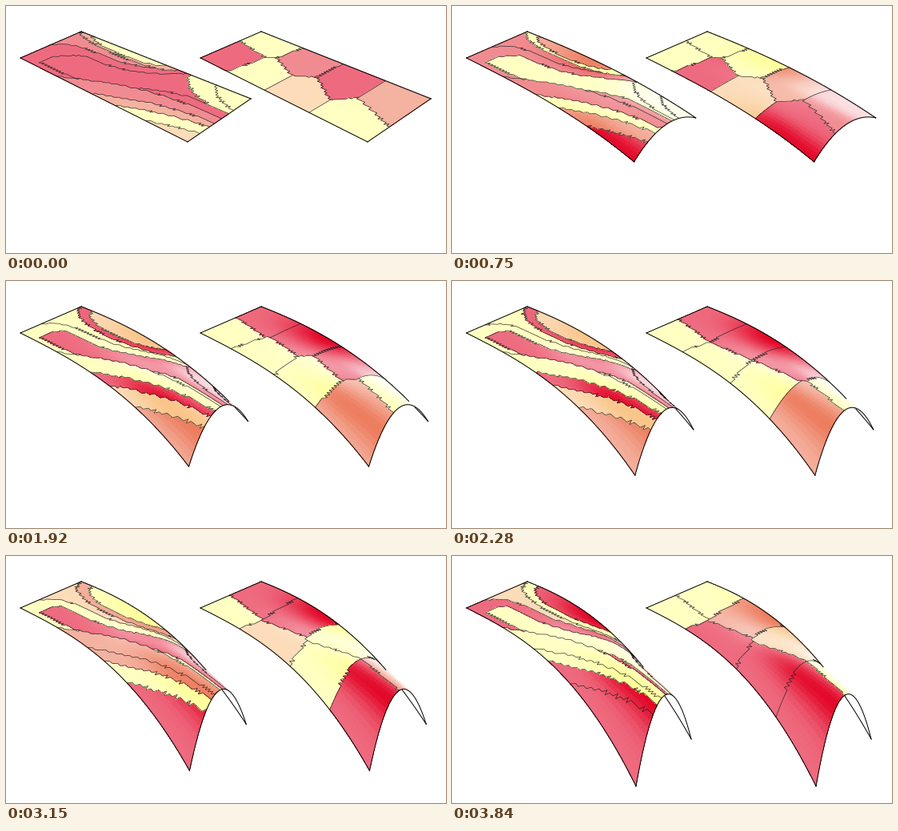
Recreate the animation shown at these times as a matplotlib script. Size 550 by 309 pixels, loop 3.87 s.

```python
import numpy as np
import matplotlib.pyplot as plt
from matplotlib.animation import FuncAnimation
from matplotlib.collections import LineCollection, PolyCollection

W, H, DPI = 550, 309, 100
FRAMES, STEP = 129, 30
NU, NV = 60, 26
SHIFT = 225  # distance between the two plates
PX = 72 / DPI

PALETTE = {
    "R": (226, 0, 34), "E": (229, 57, 65), "S": (236, 122, 91),
    "H": (249, 195, 134), "Y": (255, 255, 150),
}
# Colours are dealt anew at these times.
DEALS = [375, 1080, 1665, 2295, 2910, 3495]
# ring, corner, outer arc, inner arc, tongue, four lower bands, two far zones
BAND_COLORS = ["RESYRESYHYY", "EEYSYEYSRYY", "YRYSRRYSYSS", "YYRHRYRHSRR",
               "YYRSRYRSYRR", "YHSYRSSYRRR", "RHYRYYYRREE"]
CELL_COLORS = ["RYYEHRYS", "YYRYHSRE", "YRRYSHYR", "YRYRYRSY",
               "RYHRSYYR", "YRHRYYRS", "YYRSRHRY"]

# Cell centres (u, v), near and far side in turn, before and after the regrouping
EARLY = np.array([(.07, .33), (.11, .87), (.28, .25), (.36, .78),
                  (.49, .25), (.59, .75), (.81, .2), (.87, .75)])
LATE = np.array([(.09, .24), (.12, .6), (.39, .06), (.35, .68),
                 (.65, .2), (.59, .74), (.87, .25), (.89, .85)])


def smooth(x, lo, hi):
    x = np.clip((x - lo) / (hi - lo), 0, 1)
    return x * x * (3 - 2 * x)


def bump(x, mid, width):
    return np.exp(-((x - mid) / width) ** 2)


def surface(u, v, t):
    """Screen position of the plate point (u, v) at time t."""
    near = .034 * t - 8.5e-7 * t * t
    back = .0325 * t - 8e-7 * t * t
    arch = (near + back) / 2 - .0084 * t
    drop = near * (1 - v) + back * v - 4 * arch * v * (1 - v)
    x = 18 + 209 * u + 76 * v + 3 * u * v + (3 - 10 * v) * u**2 * t / 3840
    y = 65 + 105 * u - 33 * v - 21 * u * v + drop * u**(2.8 - .4 * v)
    return np.stack([x, y], -1)


# Triangle mesh over the plate
gu, gv = np.meshgrid(np.linspace(0, 1, NU + 1), np.linspace(0, 1, NV + 1),
                     indexing="ij")
gu, gv = gu.ravel(), gv.ravel()
node = np.arange(gu.size).reshape(NU + 1, NV + 1)
p, q, r, s = node[:-1, :-1], node[1:, :-1], node[1:, 1:], node[:-1, 1:]
tris = np.stack([np.stack([p, q, r], -1), np.stack([p, r, s], -1)], 2).reshape(-1, 3)
tri_id = np.arange(len(tris)).reshape(NU, NV, 2)
cu, cv = gu[tris].mean(1), gv[tris].mean(1)


def links(a, b, left, right):
    return np.stack([g.ravel() for g in (a, b, left, right)], 1)


# Inner edges: two nodes and the two triangles they part
edges = np.concatenate([
    links(p, r, tri_id[..., 0], tri_id[..., 1]),
    links(q[:-1], r[:-1], tri_id[:-1, :, 0], tri_id[1:, :, 1]),
    links(p[:, 1:], q[:, 1:], tri_id[:, 1:, 0], tri_id[:, :-1, 1]),
])


def band_labels(t):
    u, v = cu, cv
    settle = 1 - np.exp(-(t / 1300) ** 1.5)

    # A tongue along the plate that opens towards the free end
    top = .58 - .19 * settle + 3 * np.maximum(u - .25, 0) ** 2
    bottom = .1 + (.55 - .08 * settle) * smooth(u, .2, .8)
    tongue = (v < top) & (v > bottom) & (u > .08 + .7 * (v - .2) ** 2)
    corner = v > top + .14 - .25 * np.exp(-u / .04)

    # Nested half ellipses on the far edge
    arc = ((u - .285) / .28) ** 2 + ((v - 1) / (.17 + .2 * settle)) ** 2

    # Lower bands start on the near edge and level off
    starts = np.array([.22, .42, .56, .74])
    starts -= np.array([0, .03, .08, .14]) * t / 3840
    lower = [v < (.67 - .5 * k) * np.tanh((u - k) / .33) for k in starts]

    far = [v > .63 + d / 2 + .37 * np.exp((.64 + d - u) / .1) for d in (0, .13)]

    labels = np.zeros(len(tris), int)
    zones = [corner, arc < 1, arc < .58, tongue, *lower, *far]
    for n, zone in enumerate(zones, 1):
        labels[zone] = n
    return labels


def cell_labels(t):
    seeds = EARLY + (LATE - EARLY) * smooth(t, 1410, 2670)
    du = 2.7 * (cu[:, None] - seeds[:, 0])
    dv = cv[:, None] - seeds[:, 1]
    return np.argmin(du**2 + dv**2, 1)


def whiteness(t):
    """Share of white mixed in: deep on the flanks, pale along the fold."""
    rise = min(1, t / 800)
    ramp = smooth(cu, .4, .8)
    lane = .38 * smooth(t, 300, 3200)
    w = .42 - .4 * rise * bump(cu, .4, .2) * bump(cv, 1, .3)
    w -= .4 * rise * ramp * bump(cv, lane, .17)
    w += .45 * rise * ramp / (1 + np.exp((.66 - cv) / .05))
    w += .2 * min(1, t / 2000) * bump(cu, .55, .25) * bump(cv, .5, .2)
    return np.clip(w, 0, .93)[:, None]


class Plate:
    def __init__(self, ax, dx, labels, schemes):
        self.dx, self.labels = dx, labels
        self.schemes = [np.array([PALETTE[c] for c in s]) / 255 for s in schemes]
        self.back, = ax.plot([], [], "k", lw=PX, zorder=1)
        self.fill = PolyCollection([], antialiased=False, linewidth=0, zorder=2)
        self.seams = LineCollection([], colors="#222222", linewidths=.65 * PX, zorder=3)
        ax.add_collection(self.fill)
        ax.add_collection(self.seams)
        self.rims = [ax.plot([], [], "k", lw=PX, zorder=4)[0] for _ in range(4)]

    def draw(self, t, deal, white):
        pts = surface(gu, gv, t) + (self.dx, 0)
        corner = pts[tris]
        a, b = corner[:, 1] - corner[:, 0], corner[:, 2] - corner[:, 0]
        front = a[:, 0] * b[:, 1] - a[:, 1] * b[:, 0] < 0

        labels = self.labels(t)
        base = self.schemes[deal][labels]
        self.fill.set_verts(corner[front])
        self.fill.set_facecolor((base + (1 - base) * white)[front])

        m, n = edges[:, 2], edges[:, 3]
        cut = (labels[m] != labels[n]) & front[m] & front[n]
        self.seams.set_segments(pts[edges[cut, :2]])

        # The far rim is hidden where the plate folds over it.
        grid = pts.reshape(NU + 1, NV + 1, 2)
        self.back.set_data(*grid[:, -1].T)
        far = grid[:, -1].copy()
        far[1:][~front[tri_id[:, -1, 1]]] = np.nan
        for rim, line in zip(self.rims, (grid[0], grid[:, 0], grid[-1], far)):
            rim.set_data(*line.T)


fig = plt.figure(figsize=(W / DPI, H / DPI), dpi=DPI, facecolor="white")
ax = fig.add_axes([0, 0, 1, 1])
ax.set_xlim(0, W)
ax.set_ylim(H, 0)
ax.axis("off")
plates = [Plate(ax, 0, band_labels, BAND_COLORS),
          Plate(ax, SHIFT, cell_labels, CELL_COLORS)]


def draw(i):
    t = i * STEP
    deal = np.searchsorted(DEALS, t)
    white = whiteness(t)
    for plate in plates:
        plate.draw(t, deal, white)
    return []


anim = FuncAnimation(fig, draw, frames=FRAMES, interval=STEP, repeat=True,
                     repeat_delay=0, init_func=lambda: draw(0))
plt.show()
```
